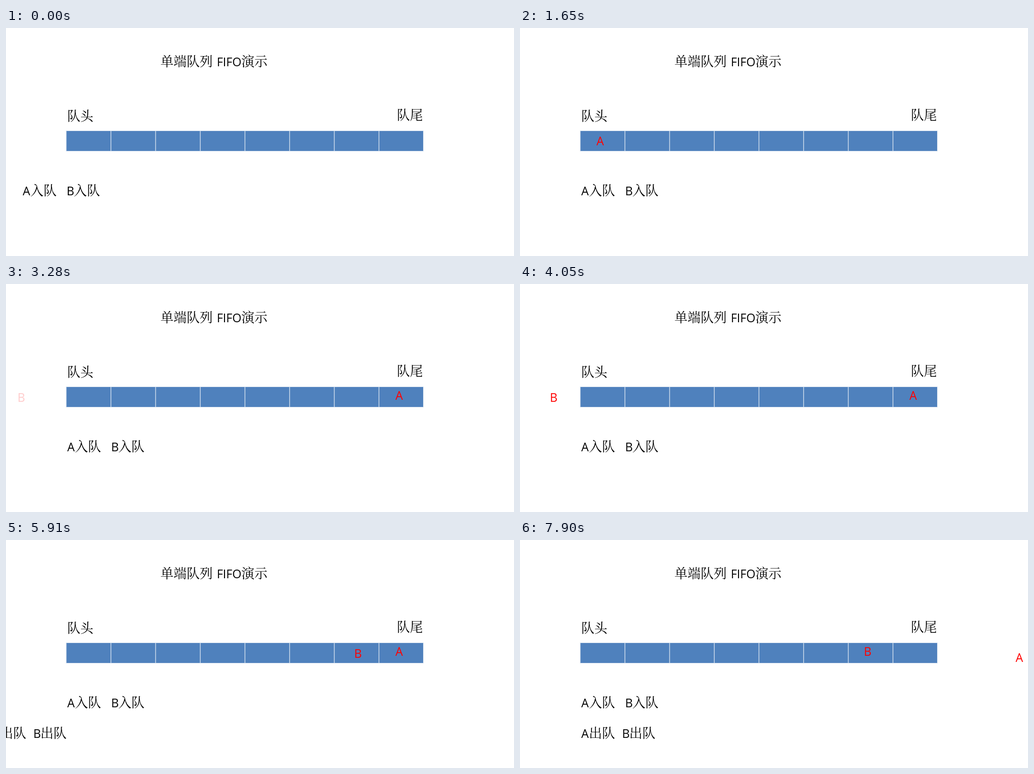
An HTML page for the animation above (7990 ms loop, 995 by 447 pixels).

```html
<!DOCTYPE html>
<html lang="zh-CN">
<head>
<meta charset="utf-8">
<title>单端队列</title>
<style>
  html, body { margin: 0; width: 100%; height: 100%; overflow: hidden; background: #fff; }
  svg { display: block; width: 995px; height: 447px; }
  text { font: 23px "Open Sans", sans-serif; }
  .han { font: 200 25.6px "Noto Serif CJK SC", "Noto Sans CJK SC", "Noto Sans CJK", serif; }
  .item { fill: #f00; text-anchor: middle; }
</style>
</head>
<body>
<svg viewBox="0 0 995 447">
  <text class="han" x="302.5" y="75">单端队列</text>
  <text x="413" y="74.5">FIFO</text>
  <text class="han" x="461" y="75">演示</text>
  <text class="han" x="120" y="182">队头</text>
  <text class="han" x="765.5" y="180">队尾</text>

  <g stroke="#dce6f2">
    <rect x="118" y="201.5" width="699.5" height="40" fill="#4f81bd"/>
    <path id="dividers" stroke-width="1.3"/>
  </g>

  <g id="enqueue">
    <text x="120" y="327.5">A</text><text class="han" x="135" y="327.5">入队</text>
    <text x="206" y="327.5">B</text><text class="han" x="220" y="327.5">入队</text>
  </g>
  <g id="dequeue">
    <text x="120" y="387.5">A</text><text class="han" x="135" y="387.5">出队</text>
    <text x="200" y="387.5">B</text><text class="han" x="214" y="387.5">出队</text>
  </g>

  <text id="itemA" class="item">A</text>
  <text id="itemB" class="item">B</text>
</svg>
<script>
const LOOP = 7990;
const MOVE = 1760;      // duration of every item move
const REORDER = 6200;   // items settle before the first one leaves
const $ = id => document.getElementById(id);

$("dividers").setAttribute("d",
  Array.from({ length: 7 }, (_, i) => `M${205.5 + i * 87.5} 201.5v40`).join(""));

const progress = (t, start, duration) => Math.min(1, Math.max(0, (t - start) / duration));
const smooth = u => u < 0.5 ? 2 * u * u : 1 - 2 * (1 - u) ** 2;
const lerp = (a, b, p) => a + (b - a) * p;

function slide(id, dx) {
  $(id).setAttribute("transform", `translate(${dx} 0)`);
}

function place(id, [x0, y0], [x1, y1], p, opacity) {
  const item = $(id);
  item.setAttribute("x", lerp(x0, x1, p));
  item.setAttribute("y", lerp(y0, y1, p) + 8);
  item.setAttribute("opacity", opacity);
}

function draw(t) {
  slide("enqueue", -87.5 * (1 - progress(t, 0, 520)) ** 2);
  slide("dequeue", -266 * (1 - progress(t, 5700, 470)));

  const move = start => smooth(progress(t, start, MOVE));
  if (t < REORDER) {
    place("itemA", [77.5, 223], [770, 218.5], move(1229), progress(t, 560, 640));
    place("itemB", [30, 223], [689.5, 223], move(3760), progress(t, 3160, 600));
  } else {
    place("itemA", [768.5, 223], [983.5, 231.5], move(6338), 1);
    place("itemB", [681, 219], [681, 219], 0, 1);
  }
}

const begin = performance.now();
function frame() {
  draw((performance.now() - begin) % LOOP);
  requestAnimationFrame(frame);
}
frame();
</script>
</body>
</html>
```
